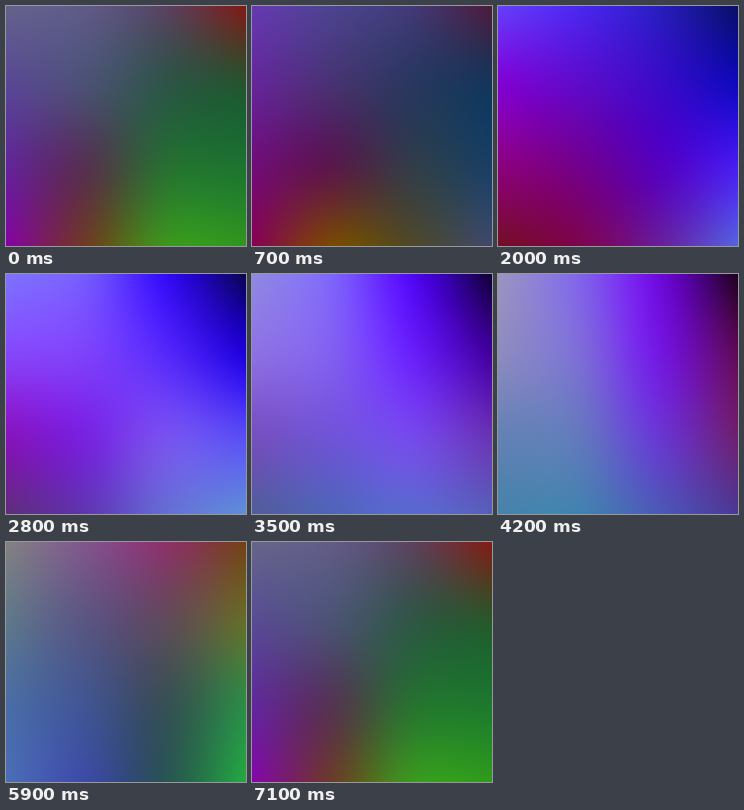
An HTML page with a canvas for the animation above (7.2 s loop, 300 by 300 pixels).

```html
<!DOCTYPE html>
<html lang="en">
<head>
<meta charset="utf-8">
<title>Drifting colour mesh</title>
<style>
html, body { margin: 0; width: 100%; height: 100%; overflow: hidden; background: #444; }
canvas { display: block; width: 100vw; height: 100vh; }
</style>
</head>
<body>
<canvas id="stage" width="300" height="300"></canvas>
<script>
const SIZE = 300, LOOP = 7200, STEP = 100;

// Each pose is a 4 x 4 mesh of colours, row by row.
const poses = [
  { at: 0, mesh: `
    #64628c #5f5a87 #5a415f #821914
    #5a4696 #4b5073 #2d5546 #23552d
    #64239b #553250 #286e32 #1c7330
    #8700a5 #6e3c23 #3e961e #30961e` },
  { at: 1300, mesh: `
    #691ed7 #412da5 #322d91 #191e5f
    #730aa5 #4b147d #2d1982 #0c198c
    #7d005f #5f0555 #410a6e #1e14a5
    #800a0f #7d4b00 #5f0046 #4b14be` },
  { at: 2000, mesh: `
    #6441fa #4b28f0 #281ebe #080f64
    #8200d2 #5f0ac8 #3c0ac8 #0f0abe
    #8c007d #73008c #5500be #461ef0
    #730f23 #7d054b #691e98 #5564e1` },
  { at: 2800, mesh: `
    #7d73ff #735aff #320af5 #080550
    #8746fa #7d41fa #5528fa #1e00dc
    #8714be #7823e1 #7650f0 #554bf5
    #5f2d78 #5f37af #646ed2 #5f91d7` },
  { at: 4200, mesh: `
    #9b96be #8264eb #6e0adc #1e001e
    #8c8cbe #7d6ed7 #7319e1 #5f0a55
    #6482b4 #6478be #6937d2 #6e1e6e
    #4682aa #4182af #4b5ab4 #4b3796` },
  { at: 5900, mesh: `
    #828282 #82558c #8c3269 #734114
    #5f788c #5a5582 #5f4b5a #646e28
    #4b6ea5 #415591 #375055 #2d8c46
    #4b6eb9 #3c4ba5 #285555 #23aa41` }
];

for (const p of poses) {
  p.rgb = p.mesh.trim().split(/\s+/).flatMap(c =>
    [1, 3, 5].map(i => parseInt(c.slice(i, i + 2), 16)));
}

const ctx = document.getElementById('stage').getContext('2d');
const image = ctx.createImageData(SIZE, SIZE);

// Weights of the four mesh lines for every pixel along an axis.
const weights = Array.from({ length: SIZE }, (_, i) => {
  const u = (i + .5) / SIZE * 3, k = Math.min(2, Math.floor(u)), f = u - k;
  const w = [0, 0, 0, 0];
  const [a, b, c, d] = hermite(f);
  const slope = (n, amount) => {
    const lo = Math.max(0, n - 1), hi = Math.min(3, n + 1);
    w[lo] -= amount / (hi - lo);
    w[hi] += amount / (hi - lo);
  };
  w[k] += a;
  w[k + 1] += c;
  slope(k, b);
  slope(k + 1, d);
  return w;
});

function hermite(f) {
  const g = f * f, h = g * f;
  return [2 * h - 3 * g + 1, h - 2 * g + f, 3 * g - 2 * h, h - g];
}

function pose(i) {
  const n = poses.length, turn = Math.floor(i / n), p = poses[i - turn * n];
  return { at: p.at + turn * LOOP, rgb: p.rgb };
}

function meshAt(t) {
  let i = poses.length - 1;
  while (poses[i].at > t) i--;
  const [p, q, r, s] = [-1, 0, 1, 2].map(n => pose(i + n));
  const span = r.at - q.at;
  const [a, b, c, d] = hermite((t - q.at) / span);
  return q.rgb.map((v, k) =>
    a * v + c * r.rgb[k] +
    b * span * (r.rgb[k] - p.rgb[k]) / (r.at - p.at) +
    d * span * (s.rgb[k] - v) / (s.at - q.at));
}

function paint(t) {
  const mesh = meshAt(t), row = new Float32Array(12), out = image.data;
  let o = 0;
  for (let y = 0; y < SIZE; y++) {
    const v = weights[y];
    for (let k = 0; k < 12; k++) {
      row[k] = v[0] * mesh[k] + v[1] * mesh[k + 12] + v[2] * mesh[k + 24] + v[3] * mesh[k + 36];
    }
    for (let x = 0; x < SIZE; x++) {
      const w = weights[x];
      for (let c = 0; c < 3; c++) {
        out[o++] = w[0] * row[c] + w[1] * row[c + 3] + w[2] * row[c + 6] + w[3] * row[c + 9];
      }
      out[o++] = 255;
    }
  }
  ctx.putImageData(image, 0, 0);
}

const start = performance.now();
let shown = -1;

function tick() {
  const t = Math.floor((performance.now() - start) % LOOP / STEP) * STEP;
  if (t !== shown) paint(shown = t);
  requestAnimationFrame(tick);
}
tick();
</script>
</body>
</html>
```
